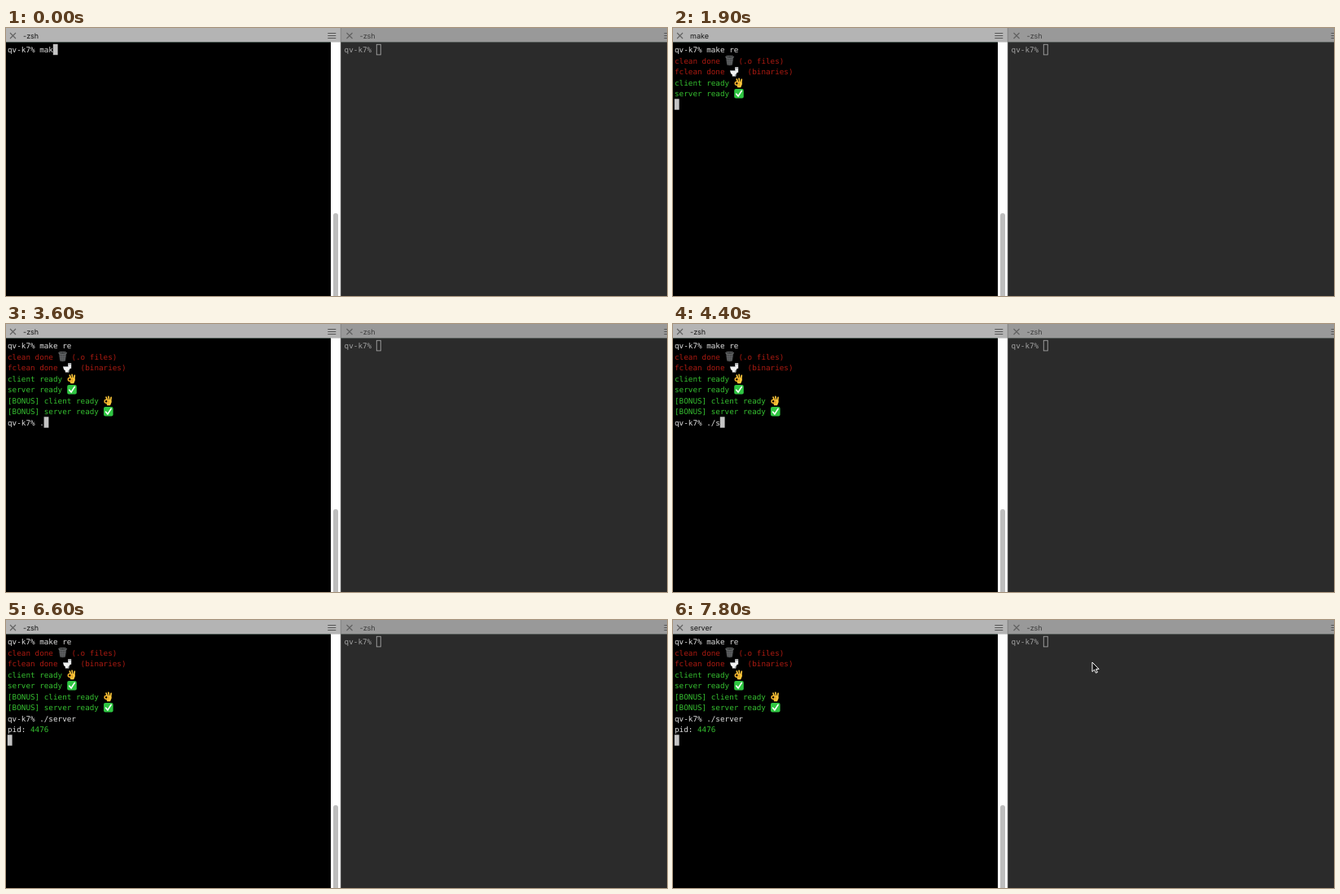
An HTML page that plays this animation: 812x330 px, repeating every 8 s.

```html
<!DOCTYPE html>
<html lang="en">
<head>
<meta charset="utf-8">
<title>Terminal session</title>
<style>
  html, body { margin: 0; width: 100%; height: 100%; overflow: hidden; background: #000; }
  svg { display: block; width: 100%; height: 100%; }
  text { white-space: pre; text-rendering: geometricPrecision; }
  .mono { font: 9.3px "DejaVu Sans Mono", monospace; }
  .title { font: 9px Inter, sans-serif; }
</style>
</head>
<body>
<svg viewBox="0 0 812 330">
  <defs>
    <g id="cross"><path d="M-3.5-3.5 3.5 3.5M3.5-3.5-3.5 3.5" fill="none" stroke-width="1.1"/></g>
    <g id="menu"><path d="M0 0H10M0 3H10M0 6H10" fill="none" stroke-width="1.1"/></g>
    <!-- emoji: origin at the left edge of the cell, centred vertically -->
    <g id="bin">
      <path d="M1.2-4.6H10.8L9.4 5.2Q6 6.6 2.6 5.2Z" fill="#454748"/>
      <path d="M3.6-3 4.4 5M6-3V5.3M8.4-3 7.6 5M2.2 0H9.8M2.5 2.6H9.4" stroke="#6d7072" stroke-width=".6"/>
      <ellipse cx="6" cy="-4.6" rx="5" ry="1.3" fill="#2a2c2d" stroke="#85888a" stroke-width=".8"/>
    </g>
    <g id="toilet">
      <path d="M7-5.6H11V1H7Z" fill="#e6e8e9"/>
      <path d="M.8-1.2H9.5V1.2Q8.8 3 7.6 3.4V5.8H3.6V3.6Q1.2 2.4.8-1.2Z" fill="#f1f2f2"/>
      <path d="M1-1.3H7.4M7.2-4.2H10.8" stroke="#8e9497" stroke-width=".8"/>
      <path d="M6.8 3.4V5.8H8.2L8.8 2Z" fill="#a9afb2"/>
    </g>
    <g id="ok">
      <path d="M4.8-.8 3.5-4.2M7-1.2 6.3-5M9-.2 9.5-4" stroke="#fbc63a" stroke-width="1.7" stroke-linecap="round"/>
      <path d="M4.6-.8Q7-2 9.8-.4 11 2 9.2 4.2L8.4 6H4.6L3.8 4Z" fill="#fbc63a"/>
      <circle cx="3.5" cy="1" r="2" fill="#000" stroke="#f4b52f" stroke-width="1.5"/>
      <path d="M6.4 0Q7.4 2 6 4" fill="none" stroke="#c98518" stroke-width=".7"/>
    </g>
    <g id="tick">
      <rect x=".4" y="-5.8" width="11.6" height="11.6" rx="2" fill="#2fc642"/>
      <path d="M3 .4 5.3 3.1 9.5-3.4" fill="none" stroke="#fff" stroke-width="1.7" stroke-linecap="round"/>
    </g>
  </defs>

  <rect width="399" height="330" fill="#000"/>
  <rect x="399" y="17" width="12" height="313" fill="#fff"/>
  <rect x="402" y="228" width="6" height="110" rx="3" fill="#bdbdbd"/>
  <rect x="411" width="401" height="330" fill="#2b2b2b"/>
  <rect width="411" height="17.5" fill="#b4b4b4"/>
  <rect x="411" width="401" height="17.5" fill="#999"/>
  <path d="M0 17.6H399" stroke="#41514a" stroke-width=".9"/>
  <path d="M411 17.6H812" stroke="#505752" stroke-width=".9"/>
  <path d="M411.3 0V330" stroke="#777" stroke-width=".7"/>
  <use href="#cross" x="8.5" y="9.5" stroke="#606060"/>
  <use href="#cross" x="422" y="9.5" stroke="#606060"/>
  <use href="#menu" x="395.3" y="6.5" stroke="#555"/>
  <use href="#menu" x="808.5" y="6.5" stroke="#555"/>
  <text id="title" class="title" x="21" y="12.6" fill="#161616"></text>
  <text class="title" x="434.5" y="12.6" fill="#3c3c3c">-zsh</text>

  <g id="rows" class="mono"></g>
  <rect id="caret" width="5.8" height="13.4" fill="#c4c4c4"/>

  <text id="idle" class="mono" x="415.6" y="30.2" fill="#a0a0a0"></text>
  <rect x="455.3" y="20.3" width="5" height="12.6" fill="none" stroke="#a3a3a3" stroke-width=".9"/>

  <path id="mouse" d="M0 0V11.6L2.7 9.1 4.5 13.2 6.4 12.4 4.7 8.4H8.2Z" fill="#111" stroke="#fff" stroke-width="1" stroke-linejoin="round"/>
</svg>
<script>
const LOOP = 8000, COL = 5.6, ROW = 13.5, LEFT = 2;
const PROMPT = 'qv-k7% ';
const WHITE = '#dedede', RED = '#ab1a11', GREEN = '#35bf30';
const $ = id => document.getElementById(id);

function add(parent, tag, attrs, text) {
  const node = document.createElementNS('http://www.w3.org/2000/svg', tag);
  for (const key in attrs) node.setAttribute(key, attrs[key]);
  if (text) node.textContent = text;
  return parent.appendChild(node);
}

const lines = [];
function word(group, row, col, fill, text) {
  return add(group, 'text', { x: LEFT + col * COL, y: 30.2 + row * ROW, fill }, text);
}
function line(row, time) {
  const group = add($('rows'), 'g', {});
  lines.push({ group, time });
  return group;
}
function status(row, time, fill, text, icon, tail, tailCol) {
  const group = line(row, time);
  word(group, row, 0, fill, text);
  add(group, 'use', { href: '#' + icon, x: LEFT + (text.length + 1) * COL, y: 26.8 + row * ROW });
  if (tail) word(group, row, tailCol, fill, tail);
}

const first = word(line(0, 0), 0, 0, WHITE);
status(1, 1600, RED, 'clean done', 'bin', '(.o files)', 14);
status(2, 1600, RED, 'fclean done', 'toilet', '(binaries)', 16);
status(3, 1800, GREEN, 'client ready', 'ok');
status(4, 1900, GREEN, 'server ready', 'tick');
status(5, 2000, GREEN, '[BONUS] client ready', 'ok');
status(6, 2200, GREEN, '[BONUS] server ready', 'tick');
const second = word(line(7, 2700), 7, 0, WHITE);
const pid = line(8, 6300);
word(pid, 8, 0, WHITE, 'pid:');
word(pid, 8, 5, GREEN, '4476');
$('idle').textContent = PROMPT;

// Times at which each further character is typed
const makeKeys = [0, 0, 0, 200, 600, 800, 1000];
const serverKeys = [3600, 3900, 4300, 4600, 4800, 5000, 5200, 5500];
const titles = [[0, '-zsh'], [1800, 'make'], [2700, 'python'], [3200, '-zsh'], [6800, 'server']];
// Caret row changes; rows 0 and 7 follow the typed text
const caretRows = [[0, 0], [1500, 1], [1600, 3], [1800, 4], [1900, 5], [2000, 6], [2200, 7], [6200, 8], [6300, 9]];
const mousePath = [[6900, [215, 77]], [7100, [250, 81]], [7200, [325, 86]], [7300, [415, 90]],
  [7400, [495, 91]], [7500, [537, 90]], [7600, [543, 88]], [7700, [530, 69]], [7800, [515, 52]]];

function latest(steps, t) {
  let value = null;
  for (const [time, next] of steps) if (t >= time) value = next;
  return value;
}
const typed = (text, keys, t) => PROMPT + text.slice(0, keys.filter(k => t >= k).length);

function draw(t) {
  for (const { group, time } of lines) group.setAttribute('display', t >= time ? 'inline' : 'none');
  const a = typed('make re', makeKeys, t), b = typed('./server', serverKeys, t);
  first.textContent = a;
  second.textContent = b;
  $('title').textContent = latest(titles, t);

  const row = latest(caretRows, t);
  const col = row === 0 ? a.length : row === 7 && t >= 2700 ? b.length : 0;
  $('caret').setAttribute('x', LEFT - 0.2 + col * COL);
  $('caret').setAttribute('y', 19.8 + row * ROW);

  const spot = latest(mousePath, t);
  $('mouse').setAttribute('display', spot ? 'inline' : 'none');
  if (spot) $('mouse').setAttribute('transform', `translate(${spot})`);
}

let start = null;
function tick(now) {
  if (start === null) start = now;
  draw((now - start) % LOOP);
  requestAnimationFrame(tick);
}
draw(0);
requestAnimationFrame(tick);
</script>
</body>
</html>
```
